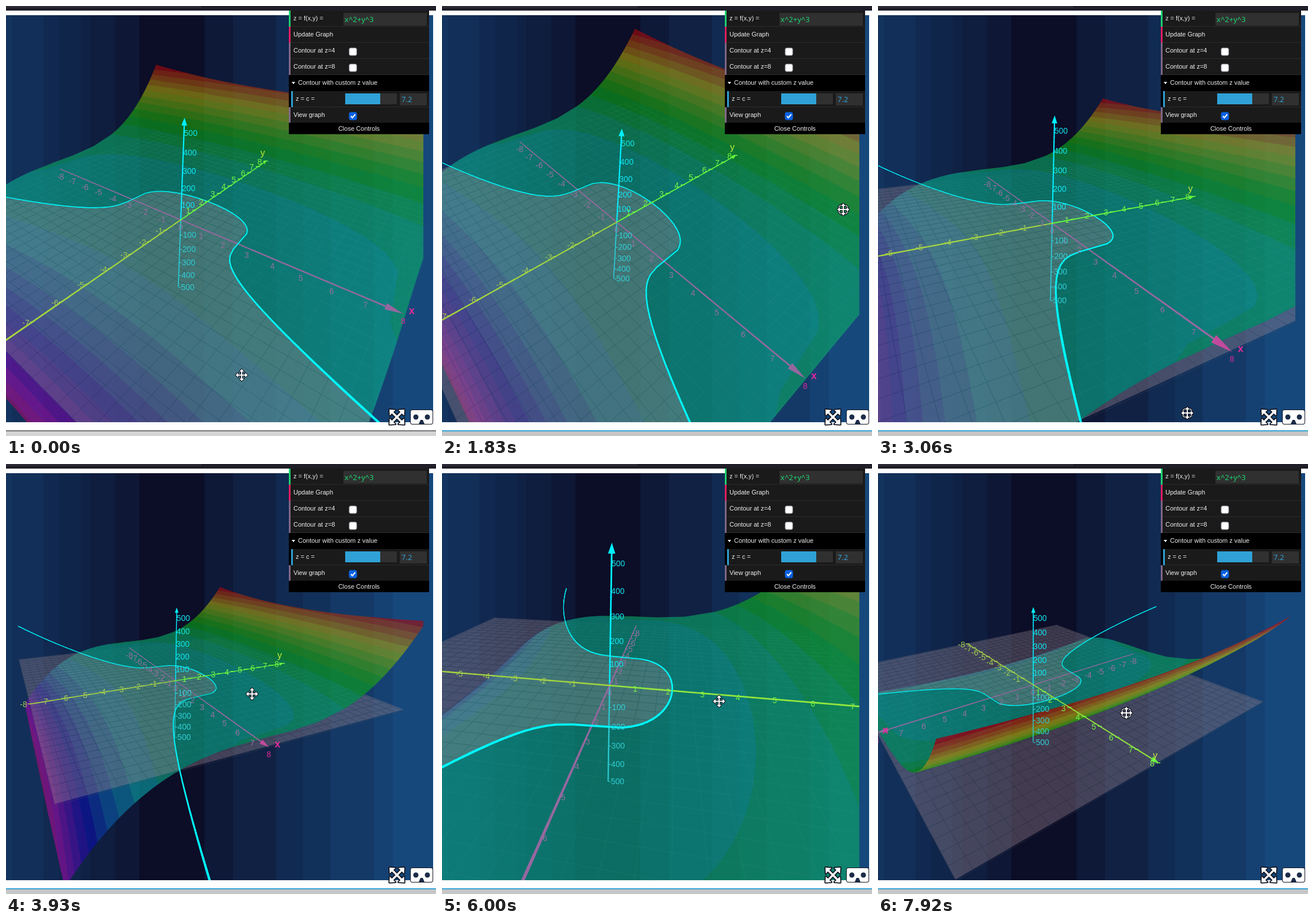
An HTML page with a canvas for the animation above (8 s loop, 748 by 748 pixels).

```html
<!DOCTYPE html>
<html>
<head>
<meta charset="utf-8">
<style>
html, body { margin: 0; width: 100%; height: 100%; overflow: hidden; background: #fff; }
canvas { display: block; }
</style>
</head>
<body>
<canvas id="stage" width="748" height="748"></canvas>
<script>
const SIZE = 748, LOOP = 8000, STEP = 136.6;
const FOCAL = 613, CX = 268, CY = 370, Z_UNIT = 136, LEVEL = 7.2;
const SANS = '"Liberation Sans", Arial, sans-serif';
const INPUT = '13px "Noto Sans", sans-serif';

// step, turn, elevation, distance, origin x, origin y, pointer x, pointer y, dragging
const KEYS = [
  [0, 39.5, 32, 14.5, 304, 372, 410, 642, 0],
  [8, 46, 32, 14.45, 304, 373, 560, 630, 1],
  [13, 51.8, 42.9, 14.36, 304, 376, 698, 354, 1],
  [18, 57, 47, 14.3, 304, 377, 610, 560, 1],
  [22, 64.3, 21.7, 14.25, 303, 378, 538, 708, 1],
  [29, 65.8, 19.8, 20.4, 295, 377, 428, 400, 0],
  [37, 66, 20, 13.5, 305, 379, 377, 408, 0],
  [41, 66, 20, 11.1, 313, 381, 377, 408, 0],
  [48, 150, 24.6, 11.1, 263, 391, 622, 419, 0],
  [52, 150, 24.6, 11.1, 263, 391, 622, 419, 0],
  [56, 149, 24.6, 18.9, 268, 383, 590, 425, 0],
  [58, 145, 24.7, 18.9, 270, 384, 432, 433, 1]
];

const ctx = document.getElementById('stage').getContext('2d');
const layer = () => Object.assign(document.createElement('canvas'), { width: SIZE, height: SIZE }).getContext('2d');
const surface = layer(), plane = layer();
let cam;

function pose(n) {
  let i = 0;
  while (i < KEYS.length - 2 && n >= KEYS[i + 1][0]) i++;
  const a = KEYS[i], b = KEYS[i + 1];
  const p = (n - a[0]) / (b[0] - a[0]);
  return a.map((v, k) => v + (b[k] - v) * p);
}

function setCamera([, turn, elev, d, ox, oy]) {
  const t = turn * Math.PI / 180, e = elev * Math.PI / 180;
  cam = {
    c: Math.cos(t), s: Math.sin(t), ce: Math.cos(e), se: Math.sin(e), d,
    px: (ox - CX) * d / FOCAL, py: (oy - CY) * d / FOCAL
  };
}

function project(x, y, z = 0) {
  const h = z / Z_UNIT;
  const right = x * cam.c + y * cam.s, ahead = y * cam.c - x * cam.s;
  const w = cam.d + ahead * cam.ce - h * cam.se, k = FOCAL / Math.max(w, .2);
  return [CX + k * (cam.px + right), CY + k * (cam.py - ahead * cam.se - h * cam.ce), w];
}

function rect(x, y, w, h, color) {
  ctx.fillStyle = color;
  ctx.fillRect(x, y, w, h);
}

function text(s, x, y, color, font = '14px ' + SANS, align = 'center') {
  ctx.font = font;
  ctx.textAlign = align;
  ctx.textBaseline = 'middle';
  ctx.fillStyle = color;
  ctx.fillText(s, x, y);
}

function trace(g, pts) {
  g.beginPath();
  pts.forEach(p => g.lineTo(p[0], p[1]));
}

function backdrop() {
  const edges = [0, 10, 65, 93, 130, 147, 190, 232, 345, 395, 470, 517, 565, 640, 673, 743];
  for (let i = 0; i < edges.length - 1; i++) {
    const t = Math.min(1, Math.abs((edges[i] + edges[i + 1]) / 2 - 285) / 420);
    rect(edges[i], 16, edges[i + 1] - edges[i], 708, `rgb(${12 + 10 * t},${12 + 60 * t},${38 + 86 * t})`);
  }
}

// Height at which a hue appears; the hues change slowly around zero.
function heightOf(hue) {
  const u = (170 - hue) / 165;
  return 550 * Math.sign(u) * Math.abs(u) ** .77;
}

// The y where x^2 + y^3 reaches z.
const levelY = (x, z) => Math.cbrt(z - x * x);
const edgeY = (x, z) => Math.max(-8, Math.min(8, levelY(x, z)));

// One side of the level curve, cut into bands of equal hue.
function cells(above) {
  const cols = 64, out = [];
  for (let hue = 0; hue < 330; hue += 14) {
    let lo = heightOf(hue + 7), hi = heightOf(hue - 7);
    if (above) lo = Math.max(lo, LEVEL);
    else hi = Math.min(hi, LEVEL);
    if (lo >= hi) continue;
    const rows = hue == 168 ? 8 : 4;
    const corner = (i, j) => {
      const x = -8 + 16 * i / cols, a = edgeY(x, lo), b = edgeY(x, hi);
      const y = a + (b - a) * j / rows;
      return project(x, y, x * x + y ** 3);
    };
    const filled = i => edgeY(-8 + 16 * i / cols, lo) < edgeY(-8 + 16 * i / cols, hi);
    for (let i = 0; i < cols; i++) {
      if (!filled(i) && !filled(i + 1)) continue;
      for (let j = 0; j < rows; j++) {
        const q = [corner(i, j), corner(i + 1, j), corner(i + 1, j + 1), corner(i, j + 1)];
        if (q.some(p => p[2] < .3)) continue;
        const [a, b, c] = q;
        const back = (b[0] - a[0]) * (c[1] - a[1]) - (b[1] - a[1]) * (c[0] - a[0]) > 0;
        out.push({ q, w: a[2] + c[2], color: `hsl(${hue},88%,${above && back ? 42 : 36}%)` });
      }
    }
  }
  return out.sort((m, n) => n.w - m.w);
}

function paint(g, list, color) {
  g.lineWidth = .9;
  g.lineJoin = 'round';
  for (const cell of list) {
    trace(g, cell.q);
    g.closePath();
    g.fillStyle = g.strokeStyle = color || cell.color;
    g.fill();
    g.stroke();
  }
}

function gridLines(g, color) {
  g.strokeStyle = color;
  g.lineWidth = 1;
  for (let v = -8; v <= 8; v += .5) {
    trace(g, [project(v, -8), project(v, 8)]);
    g.stroke();
    trace(g, [project(-8, v), project(8, v)]);
    g.stroke();
  }
}

function graph() {
  const low = cells(false), high = cells(true);
  surface.clearRect(0, 0, SIZE, SIZE);
  paint(surface, low);
  paint(surface, high);
  ctx.globalAlpha = .6;
  ctx.drawImage(surface.canvas, 0, 0);

  plane.globalCompositeOperation = 'source-over';
  plane.clearRect(0, 0, SIZE, SIZE);
  trace(plane, [project(-8, -8, LEVEL), project(8, -8, LEVEL), project(8, 8, LEVEL), project(-8, 8, LEVEL)]);
  plane.fillStyle = 'rgb(150,130,142)';
  plane.fill();
  gridLines(plane, 'rgba(60,45,60,.7)');
  plane.globalCompositeOperation = 'destination-out';
  paint(plane, high, '#000');
  ctx.globalAlpha = .4;
  ctx.drawImage(plane.canvas, 0, 0);
  ctx.globalAlpha = 1;
  gridLines(ctx, 'rgba(110,190,180,.09)');
}

// Tapered line through space; leaves out parts behind the camera.
function tube(points, color, width) {
  ctx.strokeStyle = color;
  ctx.lineCap = 'round';
  for (let i = 1; i < points.length; i++) {
    const a = points[i - 1], b = points[i];
    if (a[2] < .5 || b[2] < .5) continue;
    ctx.lineWidth = width((a[2] + b[2]) / 2);
    trace(ctx, [a, b]);
    ctx.stroke();
  }
}

function axis(at, from, to, color) {
  const pts = Array.from({ length: 25 }, (_, i) => project(...at(from + (to - from) * i / 24)));
  tube(pts, color, w => Math.max(1.2, 28 / w));
}

function cone(at, tip, length, color) {
  const a = project(...at(tip)), b = project(...at(tip - length));
  const dx = a[0] - b[0], dy = a[1] - b[1], n = Math.hypot(dx, dy) || 1, r = .1 * FOCAL / b[2];
  trace(ctx, [a, [b[0] - dy / n * r, b[1] + dx / n * r], [b[0] + dy / n * r, b[1] - dx / n * r]]);
  ctx.fillStyle = color;
  ctx.fill();
}

function axes() {
  const alongX = v => [v, 0, 0], alongY = v => [0, v, 0], alongZ = v => [0, 0, v * 100];
  const mauve = '#95689f', pink = '#e02a98', lime = '#a4d63e', green = '#62f83c', cyan = '#00f0ff';
  axis(alongZ, -5, 0, '#2cc6cf');
  axis(alongZ, 0, 5.6, cyan);
  axis(alongX, -8, 7.8, mauve);
  axis(alongY, -8, 0, lime);
  axis(alongY, 0, 7.8, cam.c < 0 ? '#94e63e' : green);
  cone(alongZ, 5.72, .38, cyan);
  cone(alongX, 8, .45, cam.se < .4 && cam.c > 0 ? '#c24a9c' : mauve);
  cone(alongY, 8, .3, green);

  const curve = [];
  for (let x = -20; x <= 20; x += .1) curve.push(project(x, levelY(x, LEVEL), LEVEL));
  tube(curve, '#00f6fa', w => Math.max(1.2, Math.min(4.2, 95 / w ** 1.5)));

  for (let v = -8; v <= 8; v++) {
    const [x, y] = project(v, 0), p = project(0, v);
    text(v, x, y + 14, v == 8 ? pink : '#96719f');
    if (!v) continue;
    const color = v > 0 ? '#76f545' : '#a3cc50';
    text(v, p[0] - 11, p[1] + 2, color);
    rect(p[0] - 4, p[1] - 1, 7, 1.5, color);
  }
  for (let v = -5; v <= 5; v++) {
    if (!v) continue;
    const [x, y] = project(0, 0, v * 100);
    text(v * 100, x, y + 2, v > 0 ? '#10e4f0' : '#30cdd4', undefined, 'left');
  }
  const xEnd = project(8, 0), yEnd = project(0, 8);
  text('x', xEnd[0] + 15, xEnd[1] - 4, pink, 'bold 18px ' + SANS);
  text('y', yEnd[0] - 6, yEnd[1] - 13, '#c8ec3a', '16px ' + SANS);
}

// Four arrows around a centre.
function arrows(x, y, scale, angle, ring) {
  ctx.save();
  ctx.translate(x, y);
  ctx.scale(scale, scale);
  ctx.rotate(angle);
  const path = new Path2D();
  for (let i = 0; i < 4; i++) {
    const m = new DOMMatrix().rotate(i * 90);
    path.addPath(new Path2D('M-1 0V-6H-4L0 -10.5L4 -6H1V0Z'), m);
  }
  ctx.lineJoin = 'round';
  ctx.strokeStyle = '#10131f';
  if (ring) {
    ctx.beginPath();
    ctx.arc(0, 0, 8.5, 0, 7);
    ctx.lineWidth = 4;
    ctx.stroke();
    ctx.lineWidth = 1.6;
    ctx.strokeStyle = '#fff';
    ctx.stroke();
    ctx.strokeStyle = '#10131f';
  }
  ctx.lineWidth = 2;
  ctx.stroke(path);
  ctx.fillStyle = '#fff';
  ctx.fill(path);
  ctx.restore();
}

function viewerIcon() {
  ctx.beginPath();
  ctx.roundRect(704, 703, 38, 24, 3);
  ctx.strokeStyle = '#10131f';
  ctx.lineWidth = 2;
  ctx.stroke();
  ctx.fillStyle = '#fff';
  ctx.fill();
  ctx.fillStyle = '#1c2c48';
  for (const x of [713, 733]) {
    ctx.beginPath();
    ctx.arc(x, 715, 4.5, 0, 7);
    ctx.fill();
  }
  trace(ctx, [[718, 727], [721, 720], [725, 720], [728, 727]]);
  ctx.fill();
}

function checkbox(y, on) {
  ctx.beginPath();
  ctx.roundRect(597, y, 13, 13, 2.5);
  ctx.fillStyle = on ? '#0a62e0' : '#fff';
  ctx.fill();
  ctx.lineWidth = 1;
  ctx.strokeStyle = on ? '#0a62e0' : '#8f8f9d';
  ctx.stroke();
  if (!on) return;
  trace(ctx, [[600, y + 6.5], [602.5, y + 9.5], [607.5, y + 3.5]]);
  ctx.strokeStyle = '#fff';
  ctx.lineWidth = 2;
  ctx.stroke();
}

function row(y, color, label, indent = 0) {
  rect(492 + indent, y, 244 - indent, 28, '#1a1a1a');
  rect(492 + indent, y, 3, 28, color);
  rect(495 + indent, y + 27, 241 - indent, 1, '#2c2c2c');
  text(label, 500 + indent, y + 14, '#eee', '11px ' + SANS, 'left');
}

function panel() {
  rect(492, 8, 244, 215, '#000');
  row(8, '#1ed36f', 'z = f(x,y) =');
  row(36, '#e61d5f', 'Update Graph');
  row(64, '#806787', 'Contour at z=4');
  row(92, '#806787', 'Contour at z=8');
  row(148, '#2fa1d6', 'z = c =', 4);
  row(176, '#806787', 'View graph');
  trace(ctx, [[497, 132], [503, 132], [500, 136]]);
  ctx.fillStyle = '#fff';
  ctx.fill();
  text('Contour with custom z value', 508, 134, '#eee', '11px ' + SANS, 'left');
  text('Close Controls', 614, 214, '#eee', '11px ' + SANS);
  rect(587, 12, 145, 22, '#303030');
  text('x^2+y^3', 589, 24, '#1ed36f', INPUT, 'left');
  rect(590, 152, 90, 19, '#303030');
  rect(590, 152, 61, 19, '#2fa1d6');
  rect(685, 152, 47, 21, '#303030');
  text('7.2', 688, 163, '#2fa1d6', INPUT, 'left');
  checkbox(73);
  checkbox(101);
  checkbox(185, true);
  rect(492, 203, 244, 20, '#000');
  text('Close Controls', 614, 214, '#eee', '11px ' + SANS);
}

function draw(n) {
  const now = pose(n);
  setCamera(now);
  rect(0, 0, SIZE, SIZE, '#fff');
  rect(0, 0, SIZE, 8, '#201e29');
  rect(0, 0, 340, 3, '#2d2b36');
  backdrop();
  ctx.save();
  ctx.beginPath();
  ctx.rect(0, 16, 726, 708);
  ctx.clip();
  graph();
  axes();
  ctx.restore();
  arrows(680, 715, 1.75, Math.PI / 4);
  viewerIcon();
  panel();
  rect(0, 738, SIZE, 2, n < 3 ? '#77777b' : '#35a5d8');
  rect(0, 740, SIZE, 8, n < 3 ? '#d4d4d4' : '#c6c6c6');
  arrows(now[6], now[7], 1, 0, now[8] > .5);
}

const start = performance.now();
let shown = -1;
function tick() {
  const t = (performance.now() - start) % LOOP;
  const n = Math.min(58, Math.floor(t / STEP + .3));
  if (n !== shown) draw(shown = n);
  requestAnimationFrame(tick);
}
tick();
</script>
</body>
</html>
```
